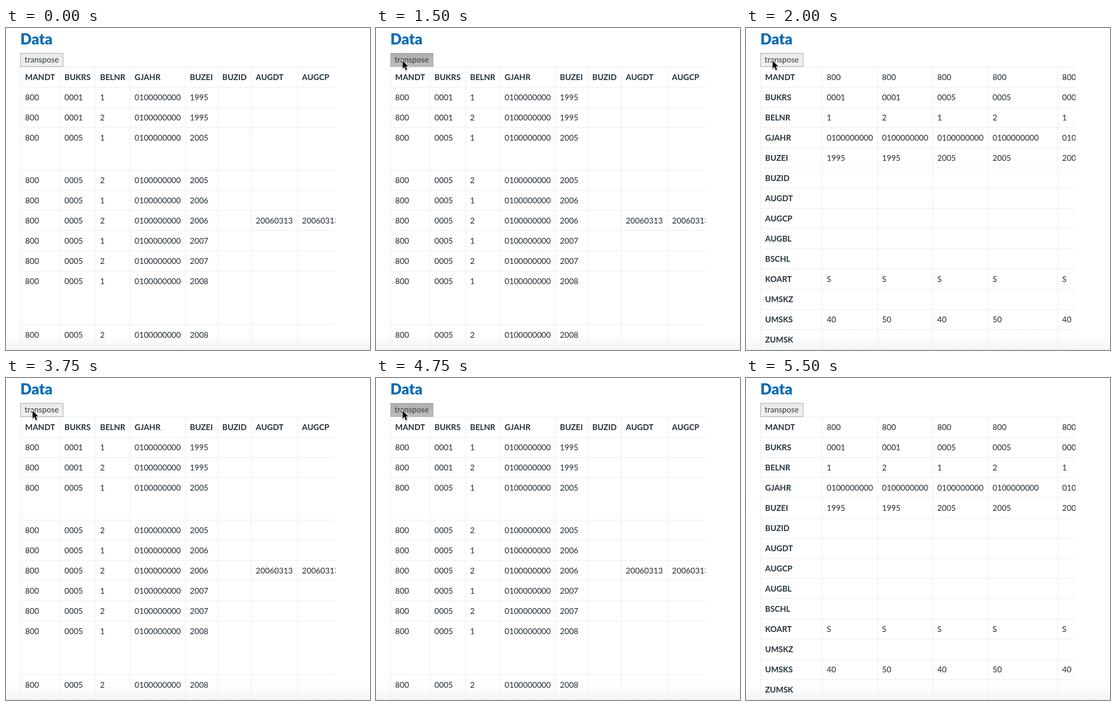
An HTML page with a canvas for the animation above (6 s loop, 685 by 606 pixels).

```html
<!DOCTYPE html>
<html lang="en">
<head>
<meta charset="utf-8">
<title>Transpose table</title>
<style>
  html, body { margin: 0; width: 100%; height: 100%; overflow: hidden; background: #fff; }
  canvas { display: block; }
</style>
</head>
<body>
<canvas id="stage" width="685" height="606"></canvas>
<script>
const ctx = document.getElementById('stage').getContext('2d');
const LOOP = 6000, LEFT = 27, TOP = 73, RIGHT = 620, ROW = 38;
const FIELDS = ['MANDT', 'BUKRS', 'BELNR', 'GJAHR', 'BUZEI', 'BUZID', 'AUGDT', 'AUGCP',
                'AUGBL', 'BSCHL', 'KOART', 'UMSKZ', 'UMSKS', 'ZUMSK'];
const YEARS = [1995, 2005, 2006, 2007, 2008];

const records = Array.from({ length: 10 }, (_, i) => {
  const cleared = i === 5 ? '20060313' : '';
  return {
    MANDT: '800', BUKRS: i < 2 ? '0001' : '0005', BELNR: 1 + i % 2, GJAHR: '0100000000',
    BUZEI: YEARS[i >> 1], AUGDT: cleared, AUGCP: cleared, KOART: 'S', UMSKS: i % 2 ? 50 : 40
  };
});

// Left edges of columns and top edges of rows for both layouts
const plain = {
  cols: [27, 101, 168, 233, 337, 398, 461, 548],
  rows: [73, 111, 149, 187, 267, 305, 343, 381, 419, 457, 558],
  cell: (r, c) => r ? records[r - 1][FIELDS[c]] : FIELDS[c],
  isHead: (r, c) => r === 0
};
const transposed = {
  cols: [27, 143, 247, 351, 455, 586],
  rows: Array.from({ length: 15 }, (_, i) => TOP + ROW * i),
  cell: (r, c) => c ? records[c - 1][FIELDS[r]] : FIELDS[r],
  isHead: (r, c) => c === 0
};

// Pointer: start time and tip position, null when away
const pointerSteps = [
  [0, null], [250, [33, 40]], [500, [35, 64]], [750, [38, 64]],
  [1250, [50, 61]], [5250, [83, 17]], [5500, null]
];
const arrow = new Path2D('M0 .5V15.2L3.4 12 6 18.2 8.6 17.1 6 11.2H10.7Z');

const within = (t, from, to) => t >= from && t < to;

function text(str, x, y, font, color) {
  ctx.font = `${font} Lato, sans-serif`;
  ctx.fillStyle = color;
  ctx.fillText(str, x, y);
}

function fade(y0, y1, from, to) {
  const g = ctx.createLinearGradient(0, y0, 0, y1);
  g.addColorStop(0, from);
  g.addColorStop(1, to);
  return g;
}

function drawTable({ cols, rows, cell, isHead }) {
  ctx.save();
  ctx.beginPath();
  ctx.rect(LEFT, TOP, RIGHT - LEFT, 606 - TOP);
  ctx.clip();
  ctx.fillStyle = '#e9eeee';
  cols.forEach(x => ctx.fillRect(x, TOP, 1, 606 - TOP));
  rows.forEach(y => ctx.fillRect(LEFT, y, RIGHT - LEFT, 1));
  rows.forEach((y, r) => cols.forEach((x, c) => {
    const head = isHead(r, c);
    text(cell(r, c) ?? '', x + 9, y + 25, `${head ? 700 : 400} 15px`, head ? '#22323c' : '#222c33');
  }));
  ctx.restore();
}

function drawButton(pressed) {
  ctx.fillStyle = '#a9a9a9';
  ctx.fillRect(27, 47, 81, 26);
  ctx.fillStyle = pressed ? fade(48, 72, '#aeaeae', '#bdbdbd') : fade(48, 72, '#e9eaea', '#f1f1f1');
  ctx.fillRect(28, 48, 79, 24);
  text('transpose', 35, 65, '400 15px', '#333a3e');
}

function drawPointer([x, y]) {
  ctx.save();
  ctx.translate(x, y);
  ctx.lineWidth = 2;
  ctx.strokeStyle = '#fff';
  ctx.shadowColor = 'rgba(0,0,0,.4)';
  ctx.shadowBlur = 2;
  ctx.shadowOffsetY = 1;
  ctx.stroke(arrow);
  ctx.shadowColor = 'transparent';
  ctx.fillStyle = '#000';
  ctx.fill(arrow);
  ctx.restore();
}

function draw(t) {
  ctx.fillStyle = '#fff';
  ctx.fillRect(0, 0, 685, 606);
  ctx.fillStyle = fade(576, 606, '#fff', '#f3f5f5');
  ctx.fillRect(0, 576, 685, 30);

  text('Data', 27, 31, '900 28px', '#006cb9');
  drawButton(within(t, 1500, 2000) || within(t, 3250, 3750) || within(t, 4750, 5000));
  drawTable(within(t, 2000, 3750) || t >= 5000 ? transposed : plain);

  const [, tip] = pointerSteps.findLast(([start]) => t >= start);
  if (tip) drawPointer(tip);
}

function tick() {
  draw(performance.now() % LOOP);
  requestAnimationFrame(tick);
}
tick();
</script>
</body>
</html>
```
